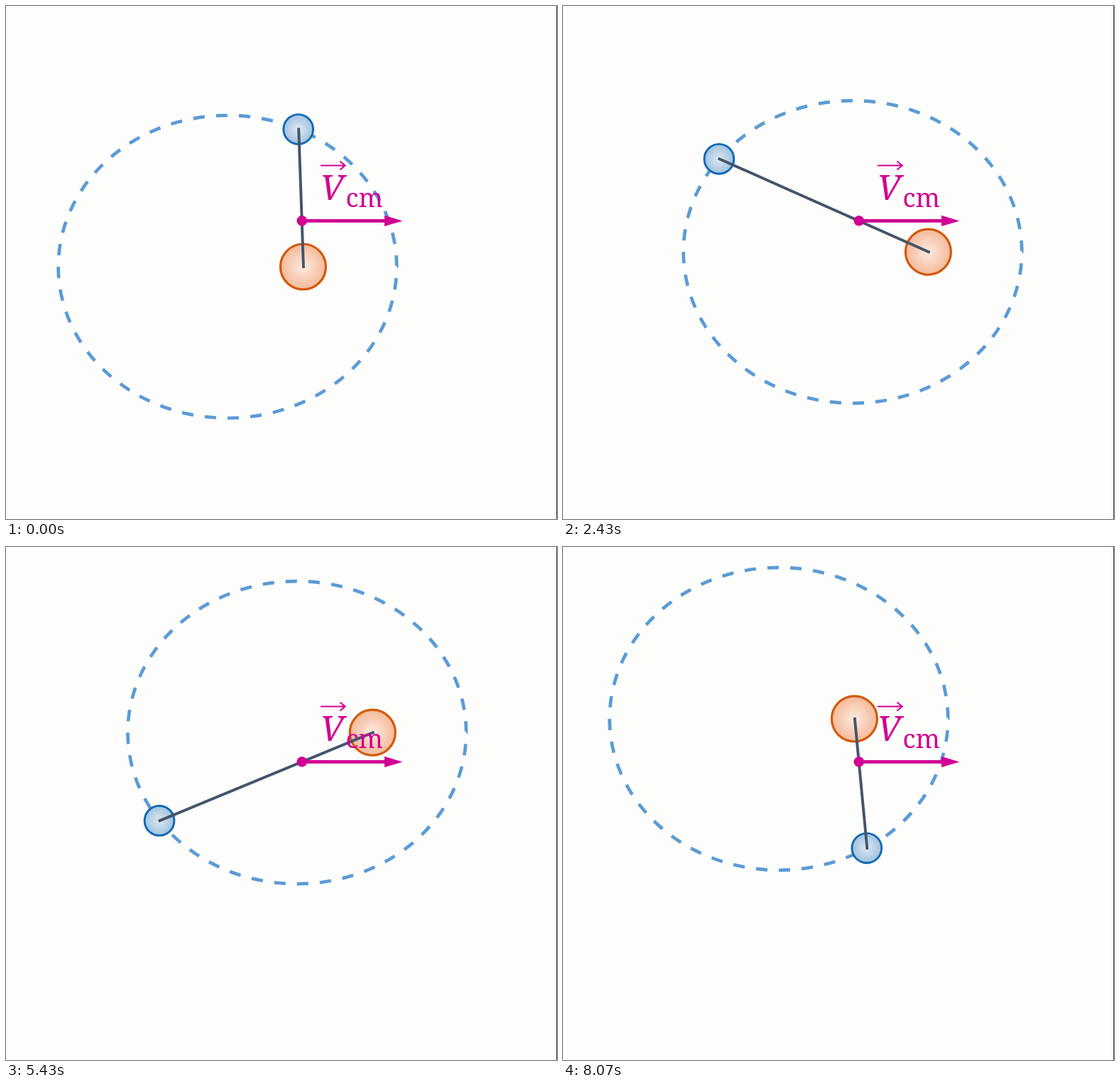
Write an HTML page that moves like this. It is 776 px wide and 722 px high and loops after 8110 ms.

```html
<!DOCTYPE html>
<html lang="en">
<head>
<meta charset="utf-8">
<title>Two-body orbit</title>
<style>
  html, body { margin: 0; width: 100%; height: 100%; overflow: hidden; background: #fdfdfc; }
  svg { display: block; }
  text { font-family: "Noto Serif", "Liberation Serif", serif; fill: #d10092; }
</style>
</head>
<body>
<svg width="776" height="722" viewBox="0 0 776 722">
  <defs>
    <radialGradient id="warm">
      <stop offset="0" stop-color="#fcebe1"/>
      <stop offset="1" stop-color="#f5b998"/>
    </radialGradient>
    <radialGradient id="cool">
      <stop offset="0" stop-color="#dfe9f2"/>
      <stop offset="1" stop-color="#9fc1df"/>
    </radialGradient>
  </defs>

  <rect x="775" width="1" height="722" fill="#3d4452"/>

  <g id="sun">
    <path d="M-344.8 0a238.3 213 0 0 0 476.6 0a238.3 213 0 0 0 -476.6 0" pathLength="44"
      fill="none" stroke="#5b9bd5" stroke-width="4.7" stroke-dasharray=".5 .5"/>
    <circle r="32" fill="url(#warm)" stroke="#d2590c" stroke-width="3.2"/>
  </g>
  <circle id="planet" r="20.9" fill="url(#cool)" stroke="#1168b2" stroke-width="2.9"/>
  <line id="rod" stroke="#44546a" stroke-width="3.9" stroke-linecap="square"/>

  <g fill="#d10092" stroke="#d10092" stroke-width="0">
    <circle cx="416.8" cy="302.3" r="7.3"/>
    <path d="M417 302.4H535" stroke-width="4.7"/>
    <path d="M533 294.8L558.5 302.4L533 310z"/>
    <path d="M443 224.5H477M470.5 218.5L477.5 224.5L470.5 230.5" fill="none" stroke-width="2.2"/>
  </g>
  <text x="442" y="272.5" font-size="50" font-style="italic">V</text>
  <text x="478.5" y="282.5" font-size="36.5">cm</text>
</svg>

<script>
  const LOOP = 8110, STEPS = 200;
  const A = 238.3, B = 213, C = 106.5;      // semi-axes and focal distance
  const CM = { x: 416.2, y: 302.5 };
  // step and mean anomaly in degrees
  const PACE = [[0, 42], [39, 96.85], [81, 155.9], [108, 194.45], [134, 230.5], [159, 268.2], [199, 323.2]];

  const [sun, planet, rod] = ["sun", "planet", "rod"].map(id => document.getElementById(id));

  function set(el, attrs) {
    for (const name in attrs) el.setAttribute(name, attrs[name]);
  }

  function meanAnomaly(step) {
    const i = Math.max(1, PACE.findIndex(p => p[0] >= step));
    const [s0, m0] = PACE[i - 1], [s1, m1] = PACE[i];
    return (m0 + (m1 - m0) * (step - s0) / (s1 - s0)) * Math.PI / 180;
  }

  // Newton iteration on Kepler's equation
  function eccentricAnomaly(m) {
    const e = C / A;
    let E = m;
    for (let i = 0; i < 6; i++) E -= (E - e * Math.sin(E) - m) / (1 - e * Math.cos(E));
    return E;
  }

  function draw(time) {
    const step = Math.min(STEPS - 1, Math.floor((time % LOOP + 6) * STEPS / LOOP));
    const E = eccentricAnomaly(meanAnomaly(step));
    const rx = A * Math.cos(E) - C, ry = -B * Math.sin(E);
    const sx = CM.x - rx / 3, sy = CM.y - ry / 3;
    const px = sx + rx, py = sy + ry;

    set(sun, { transform: `translate(${sx} ${sy})` });
    set(planet, { cx: px, cy: py });
    set(rod, { x1: px + .5, y1: py, x2: sx + .5, y2: sy });
  }

  const start = performance.now();
  function tick() {
    draw(performance.now() - start);
    requestAnimationFrame(tick);
  }
  tick();
</script>
</body>
</html>
```
